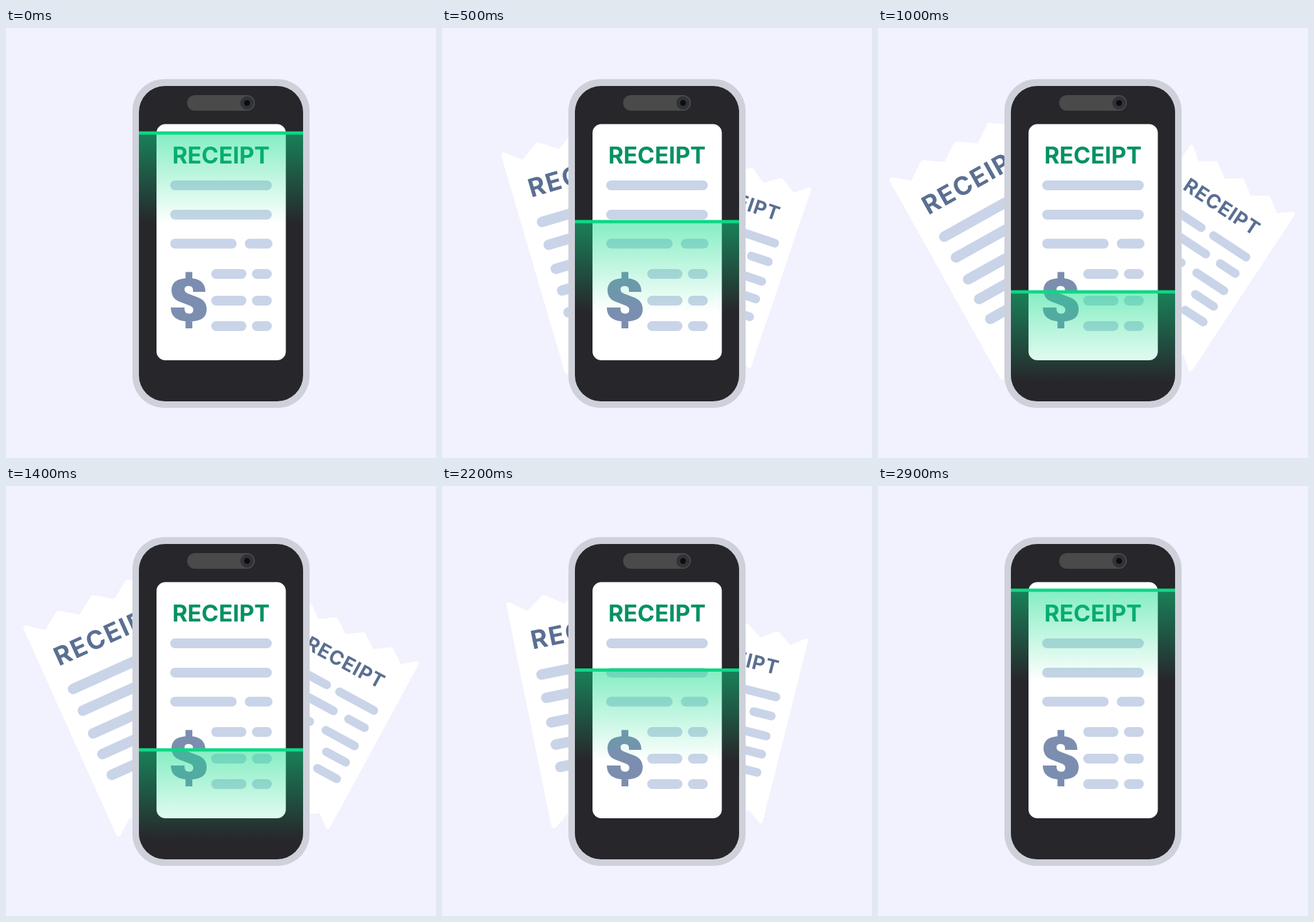
Recreate the animation shown at these times as an HTML page. Size 660x660 px, loop 3000 ms.

```html
<!DOCTYPE html>
<html lang="en">
<head>
<meta charset="utf-8">
<style>
  html, body { margin: 0; width: 100%; height: 100%; overflow: hidden; background: #f1f2fd; }
  svg { display: block; width: 100vw; height: 100vh; }
  text { font: 700 35.6px Inter, sans-serif; }
  .bar { fill: #c9d4e8; }
  .paper { fill: #fff; stroke: #fff; stroke-width: 8; stroke-linejoin: round; }
  .receipt text { fill: #5a6f92; }
</style>
</head>
<body>
<svg viewBox="0 0 660 660">
  <defs>
    <linearGradient id="glow" x2="0" y2="1">
      <stop stop-color="#0adc87" stop-opacity=".5"/>
      <stop offset="1" stop-color="#0adc87" stop-opacity="0"/>
    </linearGradient>
    <clipPath id="screen"><rect x="204" y="89" width="252" height="484" rx="40"/></clipPath>
  </defs>

  <g id="left" class="receipt"></g>
  <g id="right" class="receipt"></g>

  <rect x="194" y="78.5" width="272" height="504.5" rx="49" fill="#cfd1da"/>
  <rect x="204" y="89" width="252" height="484" rx="40" fill="#27262b"/>
  <rect x="278" y="103" width="104" height="24" rx="12" fill="#4b4a4a"/>
  <circle cx="370" cy="115" r="10.3" fill="#303338"/>
  <circle cx="370" cy="115" r="4.5" fill="#0d0d10"/>

  <rect x="231" y="147.5" width="198.5" height="362.5" rx="13.5" fill="#fff"/>
  <text x="330" y="208" text-anchor="middle" fill="#049261">RECEIPT</text>
  <g id="lines"></g>
  <path fill="#7c8eb0" d="M306 405H287V402Q287 396 280.5 396Q274 396 274 401Q274 405.5 279 407.5L296 414
    Q308 419 308 432Q308 450.5 281 450.5Q253 450.5 253 429H274V431Q274 438.5 281 438.5
    Q287.5 438.5 287.5 432.5Q287.5 428.5 283 426.5L265 419.5Q254 415 254 402.5Q254 384 280.5 384
    Q306 384 306 405ZM275.5 374.5H286V386H275.5ZM275.5 449H286V461H275.5Z"/>

  <g clip-path="url(#screen)">
    <g id="scan">
      <rect x="204" width="252" height="139" fill="url(#glow)"/>
      <rect x="204" y="-2.5" width="252" height="5" fill="#0cd884"/>
    </g>
  </g>
</svg>
<script>
const LOOP = 3000, STEP = 100, LEAD = 40;
const $ = id => document.getElementById(id);
const bar = (x1, x2, y, h) =>
  `<rect class="bar" x="${x1}" y="${y - h / 2}" width="${x2 - x1}" height="${h}" rx="${h / 2}"/>`;

// Torn paper centred on the origin; each gap splits one row into two bars.
function receipt(gaps, textX, size, spacing) {
  const edge = [];
  for (let i = 0; i <= 8; i++) {
    const x = Math.max(-113, Math.min(113, -117 + i * 29.25));
    edge.push([x, i % 2 ? 153 : 173]);
  }
  const points = [...edge.map(([x, y]) => [x, -y]), ...edge.reverse()];
  const rows = [-58, -21.5, 17, 51.7, 86.7];
  return `<polygon class="paper" points="${points.join(' ')}"/>
    <text x="${textX}" y="-98.5" style="font-size:${size}px;letter-spacing:${spacing}px">RECEIPT</text>` +
    rows.map((y, i) => bar(-93.5, gaps[i][0], y, 16) + bar(gaps[i][1], 92.7, y, 16)).join('');
}

const gaps = [[27, 43], [-2, 16], [3, 36], [-2, 36]];
$('left').innerHTML = receipt([[45, 58], ...gaps], -91, 39, 2.1);
$('right').innerHTML = receipt([[-7, 4], ...gaps], -85, 36.4, 1.2);
$('lines').innerHTML = [
  [252, 408, 241.5], [252, 408, 286.5], [252, 354, 331], [366.5, 409, 331],
  ...[377.5, 418.5, 457.5].flatMap(y => [[315, 369, y], [377.5, 408, y]])
].map(b => bar(...b, 15)).join('');

const ease = (t, start, end) => {
  const u = Math.max(0, Math.min(1, (t - start) / (end - start)));
  return u * u * (3 - 2 * u);
};
const mix = (a, b, k) => a + (b - a) * k;

function place(id, t, { home, out, y, wide, settled, scale }) {
  const spread = ease(t, 0, 1000) * (1 - ease(t, 1935, 2635));
  const angle = mix(wide, settled, ease(t, 1040, 1840)) * spread;
  $(id).setAttribute('transform',
    `translate(${mix(home, out, spread)} ${y}) rotate(${angle}) scale(${scale})`);
}

function draw(now) {
  const t = (Math.floor(now % LOOP / STEP) * STEP + LEAD) % LOOP;
  place('left', t, { home: 312, out: 204.7, y: 329.2, wide: -29.2, settled: -19.3, scale: 1 });
  place('right', t, { home: 364, out: 480.3, y: 353.2, wide: 33.4, settled: 23.7, scale: .825 });
  const y = mix(160, 405, ease(t, 0, 1000) - ease(t, 1890, 2590));
  $('scan').setAttribute('transform', `translate(0 ${y})`);
}

let began;
function tick(now) {
  began ??= now;
  draw(now - began);
  requestAnimationFrame(tick);
}
draw(0);
requestAnimationFrame(tick);
</script>
</body>
</html>
```
